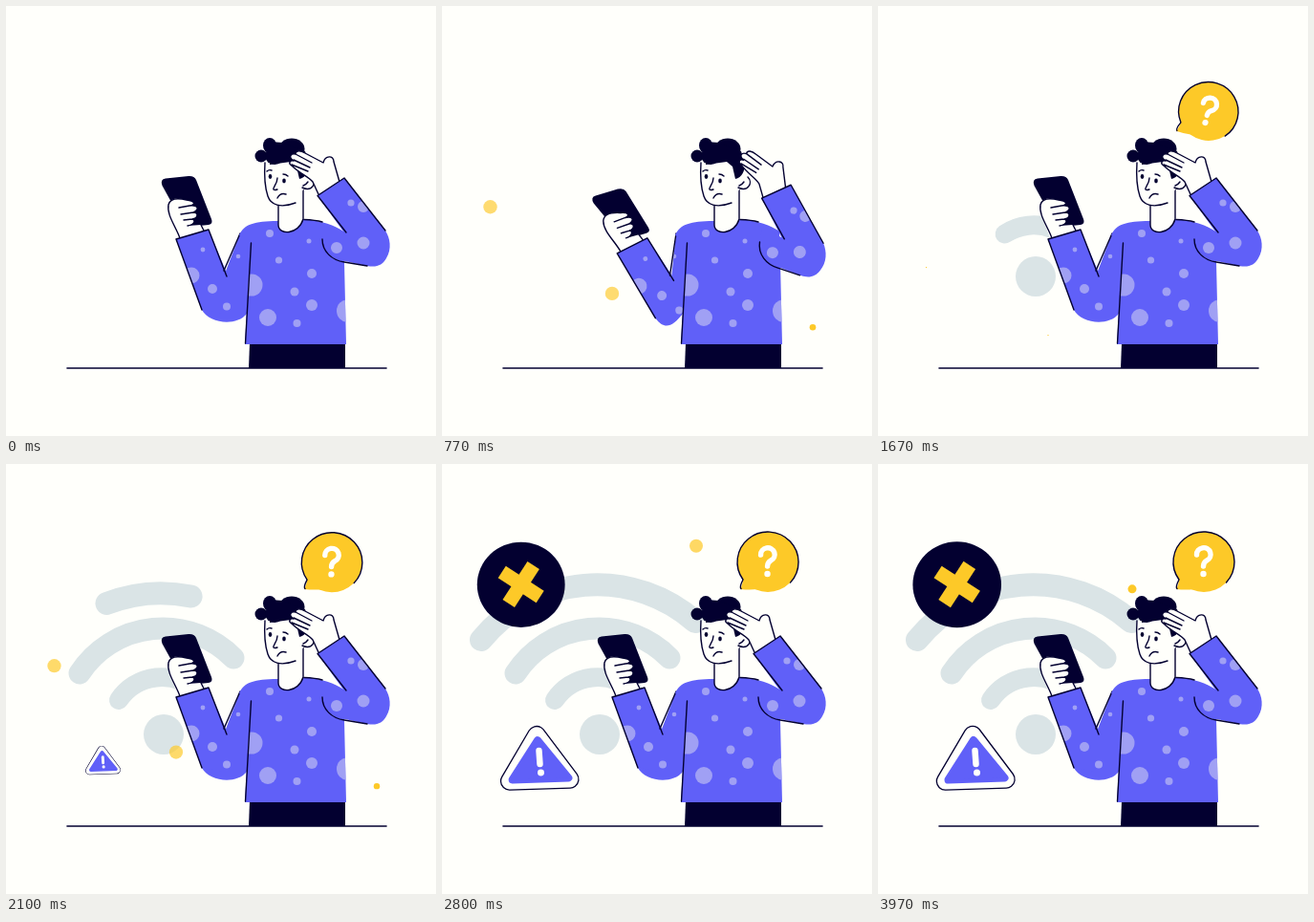
Animation, 450 px wide and 450 px high, one loop 4010 ms. Source, as an HTML page with a canvas:

```html
<!DOCTYPE html>
<html lang="en">
<head>
<meta charset="utf-8">
<title>No connection</title>
<style>
html, body { margin: 0; height: 100%; overflow: hidden; background: #fffffb }
canvas { display: block }
</style>
</head>
<body>
<canvas width="450" height="450"></canvas>
<script>
const ctx = document.querySelector('canvas').getContext('2d');
const LOOP = 4010, BEAT = LOOP / 3;
const INK = '#030030', BLUE = '#6060f8', SPOT = '#a0a0f4', SUN = '#fdc928',
      MIST = '#dae4e6', WHITE = '#fffffb';
const clamp = v => Math.max(0, Math.min(1, v));
const easeOut = v => 1 - (1 - clamp(v)) ** 3;

function fill(d, color) {
  ctx.fillStyle = color;
  ctx.fill(new Path2D(d));
}
function line(d, width = 1.4, color = INK) {
  ctx.strokeStyle = color;
  ctx.lineWidth = width;
  ctx.stroke(new Path2D(d));
}
function disc(x, y, r, color, ry = r) {
  ctx.fillStyle = color;
  ctx.beginPath();
  ctx.ellipse(x, y, r, ry, 0, 0, 7);
  ctx.fill();
}
function group(draw, matrix) {
  ctx.save();
  if (matrix) ctx.transform(matrix.a, matrix.b, matrix.c, matrix.d, matrix.e, matrix.f);
  draw();
  ctx.restore();
}
function about(x, y, deg = 0, scale = 1, dx = 0, dy = 0) {
  return new DOMMatrix().translate(x + dx, y + dy).rotate(deg).scale(scale).translate(-x, -y);
}
// Blue cloth with spots that stay inside it
function cloth(d, spots) {
  fill(d, BLUE);
  group(() => {
    ctx.clip(new Path2D(d));
    spots.forEach(([x, y, r]) => disc(x, y, r, SPOT));
  });
}
// Springy growth from 0 to 1
function spring(t, start) {
  const u = (t - start) / 1000;
  return u <= 0 ? 0 : 1 - Math.exp(-7 * u) * Math.cos(18 * u);
}

function wifi(t) {
  disc(165, 283, 21 * easeOut((t - 1400) / 240), MIST);
  [[118, 247, 200, 238, 54, 20, 1600],
   [77, 219, 238, 203, 104, 23, 1820],
   [41, 184, 265, 165, 156, 24, 2060]].forEach(([x1, y1, x2, y2, r, width, start]) => {
    const p = easeOut((t - start) / 300);
    if (!p) return;
    const length = 2 * r * Math.asin(Math.hypot(x2 - x1, y2 - y1) / 2 / r);
    group(() => {
      ctx.setLineDash([p * length, 2 * length]);
      ctx.lineDashOffset = -(1 - p) * length / 2;
      line(`M${x1} ${y1}A${r} ${r} 0 0 1 ${x2} ${y2}`, width, MIST);
    }, about(0, 0, 0, 1, 0, 14 * (1 - p)));
  });
}

function sparks(t) {
  // x, first y, speed, birth
  [[50.5, 280, .145, 290], [178, 349, .1, 290], [388, 365, .13, 550], [266, 212, .27, 997]]
    .forEach(([x, y, speed, birth]) => {
      const age = t < birth ? 600 : (t - birth) % BEAT;
      if (age >= 600) return;
      ctx.globalAlpha = clamp((640 - age) / 240);
      disc(x, y - speed * age, age * .015, SUN);
      ctx.globalAlpha = 1;
    });
}

function cross(t) {
  const s = spring(t, 2120);
  if (s) group(() => {
    disc(82.7, 126.3, 46.3, INK, 45);
    group(() => {
      ctx.fillStyle = SUN;
      ctx.fillRect(-24, -7.5, 48, 15);
      ctx.fillRect(-7.5, -24, 15, 48);
    }, new DOMMatrix().translate(82.7, 126).rotate(33));
  }, about(82.7, 126.3, 0, s));
}

function warning(t) {
  const s = spring(t, 2060);
  if (s) group(() => {
    const outer = 'M99 283.5L134 330L70.5 332Z', inner = 'M100 289L132.5 328.5L73.5 330.5Z';
    line(outer, 19.6);
    line(outer, 17, WHITE);
    fill(outer, WHITE);
    line(inner, 8, BLUE);
    fill(inner, BLUE);
    line('M101.5 300L102.5 314', 6.5, WHITE);
    disc(103.5, 323, 3.5, WHITE);
  }, about(101, 312, 0, s));
}

function bubble(t) {
  const s = spring(t, 1400), u = (t - 1400) / 1000;
  if (s) group(() => {
    disc(341, 102.3, 32, SUN, 31.6);
    fill('M315 119Q315 126 312 131Q322 132 331 131Z', SUN);
    line('M313 130.5Q311 129 315 121A32 31.6 0 1 1 364.5 124');
    line('M333.5 95A7.3 7 0 1 1 344 101Q340.5 103 340.5 107', 5.4, WHITE);
    disc(340.5, 115, 3.2, WHITE);
  }, about(313, 130, -40 * Math.exp(-4 * u) * Math.cos(11.6 * u), s));
}

function leftArm(w) {
  const m = about(229, 282, -6.5 * w, 1, 7 * w, 3 * w);
  const at = (x, y) => {
    const p = m.transformPoint({ x, y });
    return `${p.x} ${p.y}`;
  };
  fill(`M245 238L${at(229, 280)}L${at(205, 318)}C${at(212, 332)} 241 336 252 322L258 240Z`, BLUE);
  disc(243, 262, 2.3, SPOT);
  group(() => {
    fill('M180 244C177 231 168 219 170 208L198 212L208 235Z', WHITE);
    fill('M167 180.500L191 178Q197 177.500 199 182L215 223Q217 228 212 229L192 231Q187 231 185 227L163.500 188Q161 181 167 180.500Z', INK);
    const hand = 'M182 243C178 231 168 219 170 208C172 200 181 201 189 203C198 204 199 208 192 209' +
      'C201 208 203 213 196 216C202 216 201 222 195 223C199 224 197 229 190 230';
    fill(hand + 'L204 229L208 235Z', WHITE);
    line(hand + 'M192 209L181 211M196 216L183 218M195 223L186 224M204 229L207 235');
    cloth('M178 244L212 234L232 282L226 322L205 318Z',
      [[206, 255, 2.4], [194, 282, 8.5], [216, 296, 5]]);
    disc(231, 314.5, 4, SPOT);
    line('M205 318L178 244L212 234L231 283');
  }, m);
  line(`M245 238L${at(228, 277)}`);
}

function body() {
  fill('M255 353H355V379H254Z', INK);
  cloth('M256 246L244 240C249 228 260 225.500 284 225L312 223Q340 226 353 236L354 268L356 354H250Z',
    [[276, 238, 4], [285.5, 266, 3.6], [317, 246, 2.5], [320, 280, 5], [302, 299, 4.5],
     [274, 326, 9], [304.5, 332, 4], [320, 313, 6], [257, 292, 11.5], [358, 319, 12]]);
  line('M256.5 248L250.5 353M312 223.5Q324 224 331 226');
  line('M64 379H398', 1.6);
}

function head(t) {
  const neck = 'M285 208V229C285 240 306 240 311 223V192';
  fill(neck + 'Z', WHITE);
  line(neck);
  const face = 'M271 164C270 179 271 190 274 199C277 208 287 212 303 206';
  fill(face + 'L311 192C324 194 326 179 316 179L312 160Z', WHITE);
  line(face + 'M310 190C320 195 326 185 320 179M311 188Q314 187 316 184');

  disc(267, 157, 6.5, INK);
  disc(276, 146, 7, INK, 8);
  disc(281, 157, 10, INK, 9);
  disc(299, 149.5, 13.5, INK, 11);
  fill('M276 142L290 143L313 152L317 165C317 172 314 180 307 181L304 168L298 163L276 166Z', INK);

  const phase = (t % BEAT - 435) / 200;
  const open = Math.abs(phase) < .5 ? 1 - .85 * Math.cos(phase * Math.PI) ** 2 : 1;
  disc(276.5, 178.5, 1.8, INK, 2.4 * open);
  disc(291, 183, 1.8, INK, 2.4 * open);
  line('M273 173Q275 171 278 172M290 176Q293 176 295 178M284 180C284 186 279 190 280 192Q281 193 284 192' +
    'M284 201Q287 195 293 197');
}

function rightArm(w) {
  group(() => {
    const hand = 'M327 197L321 184C316 178 308 176 299 167C295 165 297 161 301 162' +
      'C295 158 298 154 303 155C303 151 308 151 313 154L332 164C334 156 343 156 343 163L349 184';
    fill(hand + 'Z', WHITE);
    line(hand + 'M299 166L316 173M301 161L318 169M303 155L320 164');
    cloth('M326 198.500L354 180L397 235C402 243 404 254 398 264C394 271 388 274 378 272L350 266' +
      'C338 262 331 254 331 244V227L353 236Z',
      [[361, 206, 3.6], [374, 210, 6], [346, 253, 6], [374, 248, 6.5]]);
    line('M356 237L326 198.500L354 180L397 235M331 244C331 257 341 266 354 268L378 272');
  }, about(375, 245, 5.5 * w, 1, .5 * w, 6 * w));
}

function draw(t) {
  ctx.fillStyle = WHITE;
  ctx.fillRect(0, 0, 450, 450);
  ctx.lineCap = ctx.lineJoin = 'round';
  // Arms dip once, then rest
  const dip = t < BEAT ? 1.72 * Math.sin(Math.PI * t / BEAT) ** 2 : 0;
  wifi(t);
  cross(t);
  sparks(t);
  warning(t);
  bubble(t);
  leftArm(dip);
  body();
  head(t);
  rightArm(dip);
}

const begin = performance.now();
function tick() {
  draw((performance.now() - begin) % LOOP);
  requestAnimationFrame(tick);
}
tick();
</script>
</body>
</html>
```
